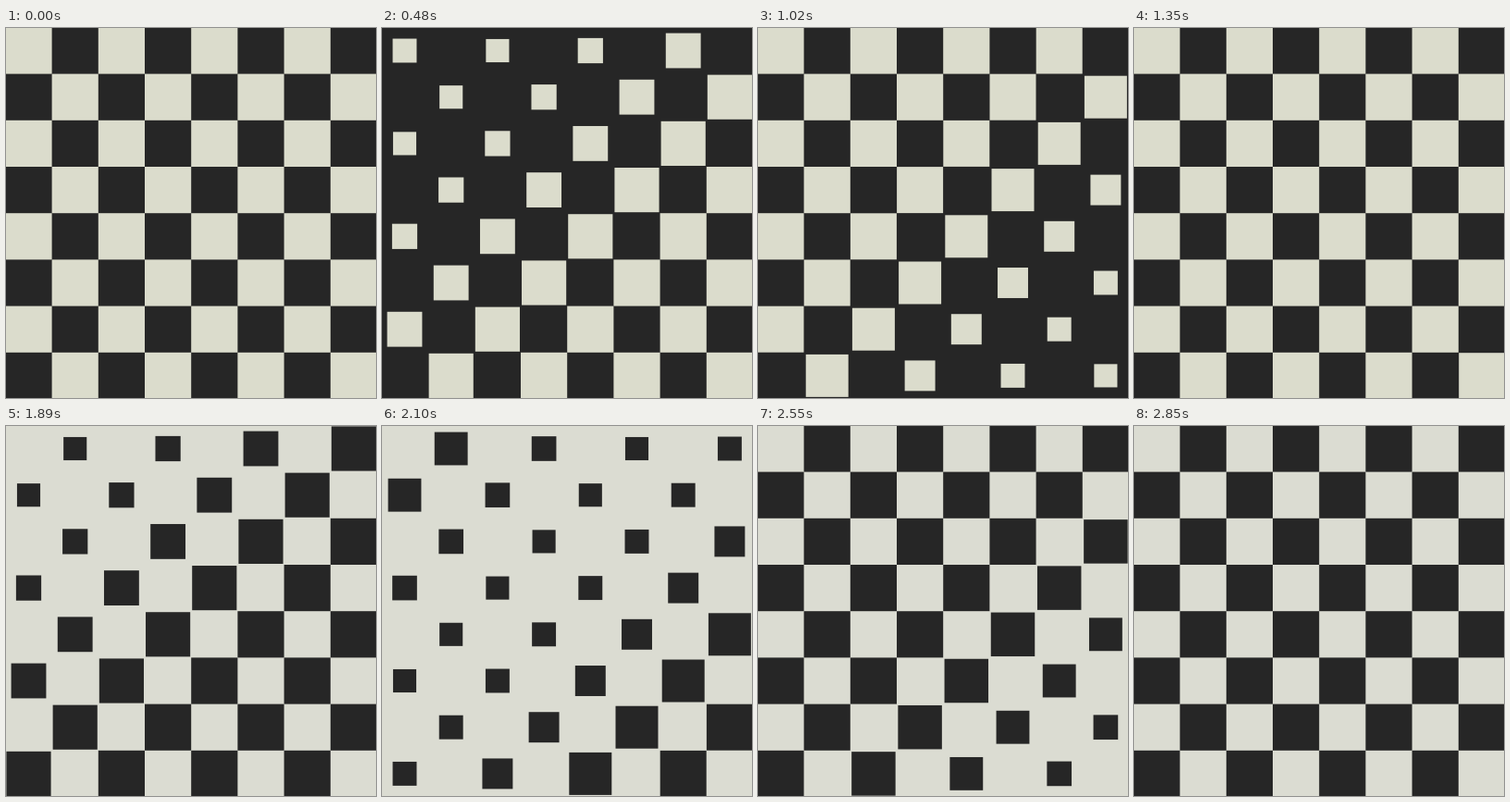
Recreate the animation shown at these times as an HTML page with a canvas. Size 400 px wide and 400 px high, loop 2.88 s.

```html
<!DOCTYPE html>
<html>
<head>
<meta charset="utf-8">
<title>Checkerboard wave</title>
<style>
html, body { margin: 0; width: 100%; height: 100%; overflow: hidden; background: #262626; }
canvas { display: block; }
</style>
</head>
<body>
<canvas id="board" width="400" height="400"></canvas>
<script>
const ctx = document.getElementById('board').getContext('2d');
const LOOP = 2880, CELLS = 8, PITCH = 50.2, FIRST = 24.5;
const STAGGER = 45, DURATION = 400;
const DARK = '#262626';

// Light squares pulse on dark, then dark squares pulse on light.
const phases = [
  { parity: 0, front: '#dbdccc', back: DARK, shrink: 12, grow: 400 },
  { parity: 1, front: DARK, back: '#dbdcd2', shrink: 1467, grow: 1866 }
];

const easeInOut = p => p < 0.5 ? 4 * p ** 3 : 1 - 4 * (1 - p) ** 3;
const progress = (t, start) =>
  easeInOut(Math.min(1, Math.max(0, (t - start) / DURATION)));

function draw(t) {
  const { parity, front, back, shrink, grow } = phases[t < 1440 ? 0 : 1];
  ctx.fillStyle = back;
  ctx.fillRect(0, 0, 400, 400);
  ctx.fillStyle = front;
  for (let row = 0; row < CELLS; row++) {
    for (let col = 0; col < CELLS; col++) {
      const diagonal = row + col;
      if (diagonal % 2 !== parity) continue;
      const local = t - diagonal * STAGGER;
      const scale = 1 - 0.5 * (progress(local, shrink) - progress(local, grow));
      const size = PITCH * scale;
      ctx.fillRect(FIRST + col * PITCH - size / 2, FIRST + row * PITCH - size / 2, size, size);
    }
  }
}

const begin = performance.now();
function tick() {
  draw((performance.now() - begin) % LOOP);
  requestAnimationFrame(tick);
}
tick();
</script>
</body>
</html>
```
